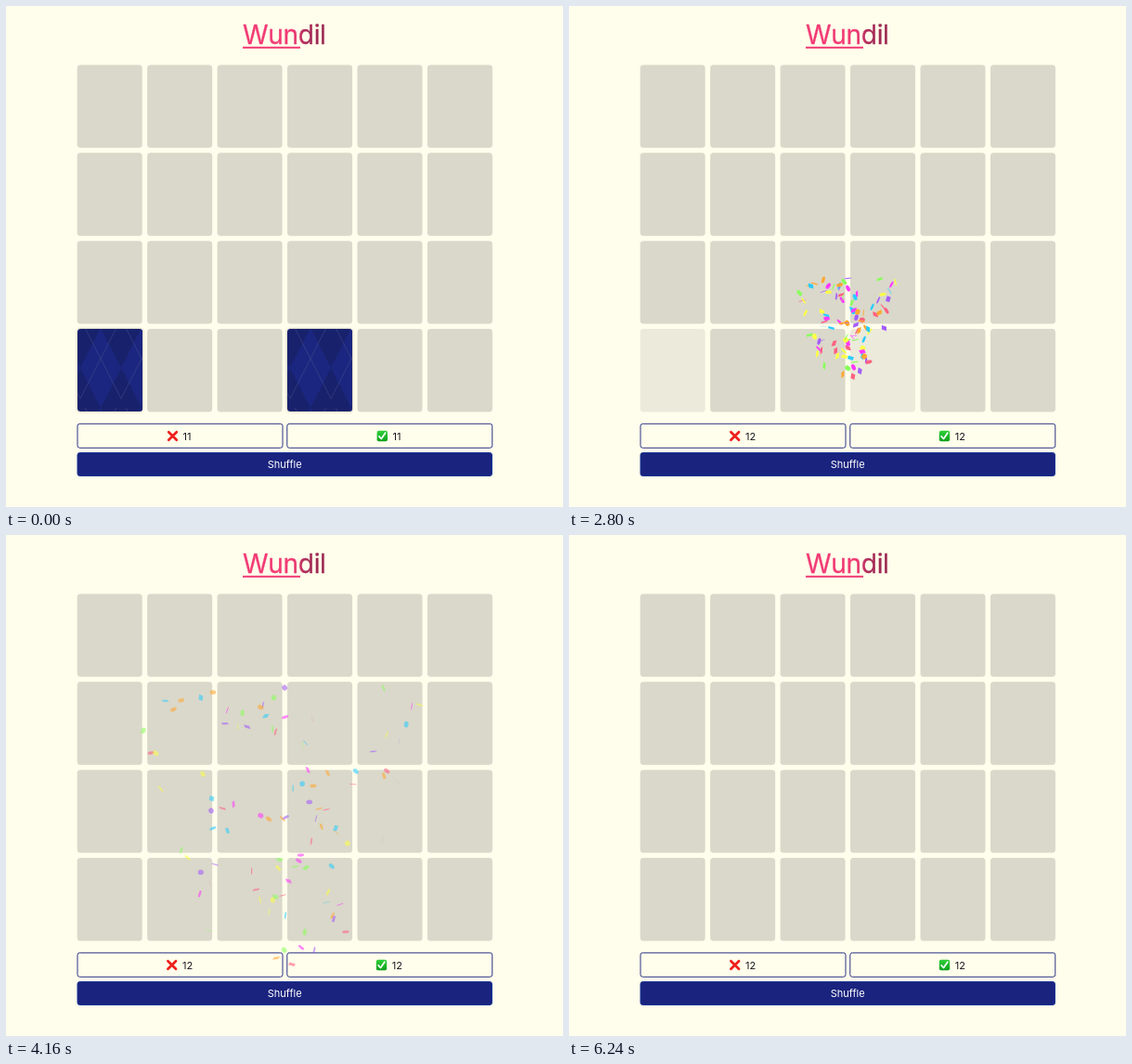
Write an HTML page with a canvas that moves like this. It is 600x540 px and loops after 6.28 s.

```html
<!DOCTYPE html>
<html lang="en">
<head>
<meta charset="utf-8">
<title>Wundil</title>
<style>
  :root { --loop: 6280ms; --navy: #1a237e; }
  html, body { margin: 0; width: 100%; height: 100%; overflow: hidden; background: #fffdeb; }
  .stage { position: relative; width: 600px; height: 540px; overflow: hidden; }
  .layer { position: absolute; left: 0; top: 0; width: 600px; height: 540px; }
  text { font-family: Inter, Roboto, sans-serif; }
  .label { font-size: 11px; fill: #17171f; }
  .slot { fill: #dad8ca; }

  .slot.late { animation: slot-in var(--loop) linear infinite; }
  .before { animation: hide var(--loop) step-end infinite; }
  .after { animation: show var(--loop) step-end infinite; }

  .card {
    position: absolute; top: 348px; width: 70px; height: 89.4px;
    perspective: 680px;
    animation: vanish var(--loop) linear infinite;
  }
  .flipper { position: absolute; inset: 0; transform-style: preserve-3d; }
  .first { left: 76.7px; }
  .second { left: 303px; }
  .first .flipper { animation: flip-first var(--loop) infinite; }
  .second .flipper { animation: flip-second var(--loop) infinite; }
  .first .side { animation: lift-first var(--loop) infinite; }
  .second .side { animation: lift-second var(--loop) infinite; }
  .side {
    position: absolute; inset: 0; overflow: hidden; border-radius: 3.5px;
    backface-visibility: hidden;
  }
  .side svg { display: block; width: 100%; height: 100%; }
  .back { background: #18216c; }
  .face { background: #f3f2f3; transform: rotateY(180deg); }

  @keyframes flip-first {
    0%, .64% { transform: rotateY(0); animation-timing-function: ease; }
    13.38%, 100% { transform: rotateY(180deg); }
  }
  @keyframes flip-second {
    0%, 16.56% { transform: rotateY(0); animation-timing-function: ease; }
    29.3%, 100% { transform: rotateY(180deg); }
  }
  @keyframes lift-first {
    0%, .64% { box-shadow: 0 0 3px rgba(0, 0, 0, .35); }
    5.4%, 100% { box-shadow: 0 0 4px rgba(0, 0, 0, .55); }
  }
  @keyframes lift-second {
    0%, 10.2% { box-shadow: 0 0 3px rgba(0, 0, 0, .35); }
    13.7%, 100% { box-shadow: 0 0 4px rgba(0, 0, 0, .55); }
  }
  @keyframes vanish {
    0%, 38.85% { opacity: 1; }
    43.31%, 100% { opacity: 0; }
  }
  @keyframes slot-in {
    0%, 43.31% { opacity: 0; }
    45.86%, 100% { opacity: 1; }
  }
  @keyframes hide { 0% { opacity: 1; } 29.3%, 100% { opacity: 0; } }
  @keyframes show { 0% { opacity: 0; } 29.3%, 100% { opacity: 1; } }
</style>
</head>
<body>
<div class="stage">
  <svg class="layer" viewBox="0 0 600 540">
    <defs>
      <linearGradient id="titleInk" gradientUnits="userSpaceOnUse" x1="255" x2="345" y1="0" y2="0">
        <stop offset=".6" stop-color="#f23a74"/>
        <stop offset=".76" stop-color="#a82b58"/>
        <stop offset="1" stop-color="#9a2850"/>
      </linearGradient>
      <radialGradient id="skin" cx=".5" cy=".35" r=".68">
        <stop offset="0" stop-color="#ffe45c"/>
        <stop offset=".6" stop-color="#fdc52f"/>
        <stop offset="1" stop-color="#e98b17"/>
      </radialGradient>
      <linearGradient id="tick" x2="0" y2="1">
        <stop offset="0" stop-color="#2fd13a"/>
        <stop offset="1" stop-color="#0fa01c"/>
      </linearGradient>
      <pattern id="argyle" width="44" height="86" patternUnits="userSpaceOnUse" x="3" y="-1">
        <path d="M22 0 44 43 22 86 0 43Z" fill="#1b2680"/>
        <path d="M0 -10 49 86M-5 86 44 -10" fill="none" stroke="#4c568f" stroke-width=".6" stroke-opacity=".7"/>
      </pattern>
      <symbol id="argyleBack" viewBox="0 0 70 89.4">
        <rect width="70" height="89.4" fill="url(#argyle)"/>
      </symbol>
      <symbol id="moneyFace" viewBox="0 0 70 89.4">
        <circle cx="35" cy="43.5" r="15.5" fill="url(#skin)"/>
        <path d="M24.5 36.5q3-3.6 6.4-2.2M39.1 34.3q3.4-1.4 6.4 2.2" fill="none" stroke="#a8630f" stroke-width="1.1" stroke-linecap="round"/>
        <g font-size="10" font-weight="600" fill="#54390c" text-anchor="middle">
          <text x="28.5" y="46">$</text>
          <text x="41.5" y="46">$</text>
        </g>
        <path d="M24.5 48.5Q35 53 45.5 48.5Q43.5 57 35 57T24.5 48.5Z" fill="#6b3510"/>
        <path d="M29.5 52.3Q35 53.4 40.5 52.3V56q0 5-5.5 5t-5.5-5Z" fill="#1fae3a"/>
        <text x="35" y="59.5" font-size="7" font-weight="600" fill="#0c6420" text-anchor="middle">$</text>
      </symbol>
      <g id="cross">
        <path d="M-4.3 -4.3 4.3 4.3M4.3 -4.3-4.3 4.3" stroke="#ee1f1b" stroke-width="2.7" stroke-linecap="round"/>
      </g>
      <g id="check">
        <rect x="-5.7" y="-5.7" width="11.4" height="11.4" rx="2" fill="url(#tick)"/>
        <path d="M-3.4 .4-1 3 3.3 -3.3" fill="none" stroke="#fff" stroke-width="1.7" stroke-linecap="round" stroke-linejoin="round"/>
      </g>
    </defs>

    <text x="255" y="40.5" font-size="28" letter-spacing="-.3" fill="url(#titleInk)" stroke="url(#titleInk)" stroke-width=".3">Wundil</text>
    <rect x="255" y="43.8" width="62" height="2" fill="#f23a74"/>

    <g id="slots"></g>

    <g fill="none" stroke="#2b3385">
      <rect x="77" y="450.3" width="221" height="26" rx="2.5"/>
      <rect x="302.8" y="450.3" width="221" height="26" rx="2.5"/>
    </g>
    <g class="before label">
      <use href="#cross" x="179.5" y="463.5"/><text x="190.5" y="467.5">11</text>
      <use href="#check" x="405.3" y="463.5"/><text x="416.5" y="467.5">11</text>
    </g>
    <g class="after label">
      <use href="#cross" x="178.7" y="463.5"/><text x="190" y="467.5">12</text>
      <use href="#check" x="404.5" y="463.5"/><text x="415.8" y="467.5">12</text>
    </g>
    <rect x="77" y="481.5" width="446.5" height="25" rx="2.5" fill="#1a237e" stroke="#1b3796"/>
    <text class="label" x="300.2" y="498" text-anchor="middle" style="fill:#fff">Shuffle</text>
  </svg>

  <div class="card first"><div class="flipper">
    <div class="side back"><svg><use href="#argyleBack"/></svg></div>
    <div class="side face"><svg><use href="#moneyFace"/></svg></div>
  </div></div>
  <div class="card second"><div class="flipper">
    <div class="side back"><svg><use href="#argyleBack"/></svg></div>
    <div class="side face"><svg><use href="#moneyFace"/></svg></div>
  </div></div>

  <canvas class="layer" width="600" height="540"></canvas>
</div>

<script>
const LOOP = 6280;
const BURST = { start: 2717, tick: 1000 / 60, life: 200, x: 300.5, y: 440, scale: 0.683, count: 100 };
const COLORS = ['#26ccff', '#a25afd', '#ff5e7e', '#88ff5a', '#fcff42', '#ffa62d', '#ff36ff'];

const slots = document.getElementById('slots');
for (let i = 0; i < 24; i++) {
  const col = i % 6, row = Math.floor(i / 6);
  const slot = document.createElementNS(slots.namespaceURI, 'rect');
  const box = { x: 76.7 + col * 75.45, y: 63.4 + row * 94.87, width: 70, height: 89.4, rx: 3.5 };
  for (const key in box) slot.setAttribute(key, box[key]);
  slot.setAttribute('class', row === 3 && col % 3 === 0 ? 'slot late' : 'slot');
  slots.append(slot);
}

let seed = 20417;
function random() {
  seed = (seed * 1664525 + 1013904223) % 4294967296;
  return seed / 4294967296;
}

const pieces = Array.from({ length: BURST.count }, (_, i) => ({
  color: COLORS[i % COLORS.length],
  round: random() < 0.5,
  angle: -Math.PI / 2 + (random() - 0.5) * Math.PI / 4,
  speed: 22.5 + random() * 45,
  wobble: random() * 10,
  wobbleSpeed: Math.min(0.11, random() * 0.1 + 0.05),
  tilt: (random() * 0.5 + 0.25) * Math.PI,
  size: random() + 2
}));

const ctx = document.querySelector('canvas').getContext('2d');

function drawPiece(p, n) {
  // Geometric drag plus a constant fall of 3 per tick
  const travel = p.speed * (1 - 0.9 ** n) / 0.1;
  const x = Math.cos(p.angle) * travel;
  const y = Math.sin(p.angle) * travel + 3 * n;
  const wobble = p.wobble + p.wobbleSpeed * n;
  const dx = 10 * Math.cos(wobble), dy = 10 * Math.sin(wobble);
  const tilt = p.tilt + 0.1 * n;
  const size = p.size + 0.5;
  const tx = size * Math.cos(tilt), ty = size * Math.sin(tilt);

  ctx.fillStyle = p.color;
  ctx.beginPath();
  if (p.round) {
    ctx.ellipse(x, y, Math.abs(dx) * 0.6, Math.abs(dy) * 0.6, Math.PI / 10 * wobble, 0, 2 * Math.PI);
  } else {
    ctx.moveTo(x, y);
    ctx.lineTo(x + dx, y + ty);
    ctx.lineTo(x + dx + tx, y + dy + ty);
    ctx.lineTo(x + tx, y + dy);
    ctx.closePath();
  }
  ctx.fill();
}

const clock = document.querySelector('.card').getAnimations()[0];

function render() {
  const time = (clock.currentTime || 0) % LOOP;
  const n = (time - BURST.start) / BURST.tick;
  ctx.clearRect(0, 0, 600, 540);
  if (n > 0 && n < BURST.life) {
    ctx.save();
    ctx.translate(BURST.x, BURST.y);
    ctx.scale(BURST.scale, BURST.scale);
    ctx.globalAlpha = 1 - n / BURST.life;
    for (const piece of pieces) drawPiece(piece, n);
    ctx.restore();
  }
  requestAnimationFrame(render);
}
requestAnimationFrame(render);
</script>
</body>
</html>
```
